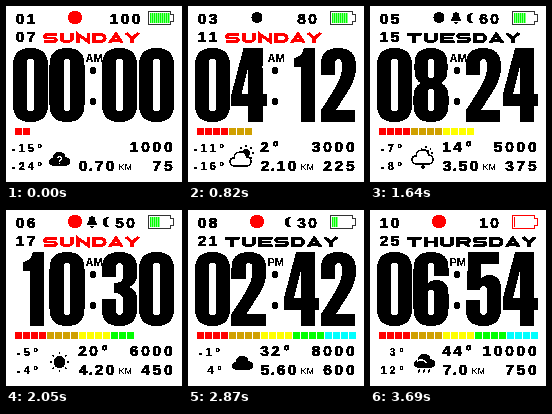
An HTML page with a canvas that plays this animation: 176 px wide and 176 px high, repeating every 4100 ms.

```html
<!DOCTYPE html>
<html lang="en">
<head>
<meta charset="utf-8">
<title>Watch face</title>
<style>
html, body { margin: 0; width: 100%; height: 100%; overflow: hidden; background: #fff; }
canvas { display: block; width: 176px; height: 176px; image-rendering: pixelated; }
</style>
</head>
<body>
<canvas id="face" width="176" height="176"></canvas>
<script>
const SIZE = 176, STEP = 410, COUNT = 10;
const RED = '#f00', BLACK = '#000', WHITE = '#fff';
const canvas = document.getElementById('face');
const ctx = canvas.getContext('2d', { willReadFrequently: true });

const slot = (y, h) => `M14 ${y + 3}Q14 ${y} 17.5 ${y}T21 ${y + 3}V${y + h - 3}Q21 ${y + h} 17.5 ${y + h}T14 ${y + h - 3}Z`;
// Hour and minute digits, drawn in a 35 x 74 box
const DIGITS = {
  0: 'M0 17Q0 0 17.5 0T35 17V57Q35 74 17.5 74T0 57Z' + slot(11, 52),
  1: 'M20 0H31V74H17V19H10V10Q18 9 20 0Z',
  2: 'M0 27V16Q0 0 17.5 0T35 18Q35 30 29 40L15 62H34V74H0V62Q16 38 19 30Q21 24 21 17Q21 11 17.5 11T14 16V27Z',
  3: 'M0 25V16Q0 0 17.5 0T35 16V22Q35 32 27 35Q35 38 35 47V57Q35 74 17.5 74T0 58V47H14V58Q14 63 17.5 63T21 58V48Q21 41 12 41V31Q21 31 21 25V16Q21 11 17.5 11T14 16V25Z',
  4: 'M12 0H31V46H35V58H31V74H17V58H0V46ZM17 18L10 46H17Z',
  5: 'M2 0H33V12H15V27Q18 23 23 23Q35 23 35 37V57Q35 74 17.5 74T0 58V48H14V58Q14 63 17.5 63T21 58V38Q21 34 17.5 34T14 38H1Z',
  6: 'M35 24V16Q35 0 17.5 0T0 17V57Q0 74 17.5 74T35 57V42Q35 28 23 28Q17 28 14 32V16Q14 11 17.5 11T21 16V24Z' + slot(38, 25),
  8: 'M17.5 0Q34 0 34 16V22Q34 32 28 35Q35 39 35 48V57Q35 74 17.5 74T0 57V48Q0 39 7 35Q1 32 1 22V16Q1 0 17.5 0Z' + slot(11, 19) + slot(41, 22)
};
// Wide weekday capitals, stroked in a 10 x 10 box
const CAPS = {
  S: 'M9.6 1.3H3Q1.3 1.3 1.3 3T3 5H7Q8.7 5 8.7 6.8T7 8.7H.5',
  U: 'M1.5 0V6Q1.5 8.7 5 8.7T8.5 6V0',
  N: 'M1.4 10V1.2L8.6 8.8V0',
  D: 'M0 1.3H5Q8.5 1.3 8.5 5T5 8.7H1.5V1.3',
  A: 'M.8 10L5 1.2L9.2 10M2.5 7.2H7.5',
  Y: 'M.8 0L5 5.5L9.2 0M5 5V10',
  T: 'M0 1.3H10M5 1V10',
  H: 'M1.5 0V10M8.5 0V10M1.5 5H8.5',
  E: 'M10 1.3H1.5V8.7H10M1.5 5H9.3',
  R: 'M1.5 10V1.3H7Q8.7 1.3 8.7 3.5T7 5.8H2M6 6L9 10',
  F: 'M10 1.3H1.5V10M1.5 5.3H9.3',
  I: 'M1.5 0V10'
};
const DAYS = ['SUNDAY', 'MONDAY', 'TUESDAY', 'WEDNESDAY', 'THURSDAY', 'FRIDAY', 'SATURDAY'];
const BAR_COLORS = [RED, '#d0a000', '#ff0', '#0f0', '#0ff'];
const SKY = ['unknown', 'sun', 'partly', 'cloud', 'shower', 'sun', 'cloud', 'cloud', 'rain', 'storm'];

const pad = n => String(n).padStart(2, '0');

function rect(x, y, w, h, color = BLACK) {
  ctx.fillStyle = color;
  ctx.fillRect(x, y, w, h);
}

function disc(x, y, r, color = BLACK) {
  ctx.fillStyle = color;
  ctx.beginPath();
  ctx.arc(x, y, r, 0, 7);
  ctx.fill();
}

function fill(path, color = BLACK) {
  ctx.fillStyle = color;
  ctx.fill(new Path2D(path), 'evenodd');
}

function line(path, width, color = BLACK) {
  ctx.strokeStyle = color;
  ctx.lineWidth = width;
  ctx.stroke(new Path2D(path));
}

// Hard pixel edges, as on an eight-colour display
function snap() {
  const image = ctx.getImageData(0, 0, SIZE, SIZE);
  const px = image.data;
  for (let k = 0; k < px.length; k++) px[k] = px[k] > 127 ? 255 : 0;
  ctx.putImageData(image, 0, 0);
}

const advance = (ch, cell) => ch === '.' ? cell * .45 : ch === '-' ? cell * .8 : cell;
const measure = (s, cell) => [...s].reduce((sum, ch) => sum + advance(ch, cell), 0);

// Centres each character in its cell; returns the right edge
function cells(s, x, y, cell = 11, size = 15.5, weight = .7) {
  ctx.font = `bold ${size}px "Liberation Sans", Arial, sans-serif`;
  ctx.textAlign = 'center';
  ctx.fillStyle = ctx.strokeStyle = BLACK;
  ctx.lineWidth = weight;
  for (const ch of s) {
    const w = advance(ch, cell);
    ctx.fillText(ch, x + w / 2, y);
    ctx.strokeText(ch, x + w / 2, y);
    x += w;
  }
  return x;
}

function label(s, x, y, font) {
  ctx.font = `${font} "Liberation Sans", Arial, sans-serif`;
  ctx.textAlign = 'left';
  ctx.fillStyle = BLACK;
  ctx.fillText(s, x, y);
}

function bigDigit(d, x) {
  ctx.save();
  ctx.translate(x, 42);
  fill(DIGITS[d]);
  ctx.restore();
}

function weekday(day) {
  let x = 37;
  for (const ch of DAYS[day]) {
    ctx.save();
    ctx.translate(x, 27);
    ctx.scale(1.47, 1);
    line(CAPS[ch], 2.6, day ? BLACK : RED);
    ctx.restore();
    x += ch === 'I' ? 6 : 16.4;
  }
}

function battery(pct) {
  const color = pct <= 10 ? RED : '#333';
  ctx.strokeStyle = color;
  ctx.lineWidth = 1;
  ctx.strokeRect(142.5, 5.5, 22, 13);
  ctx.strokeRect(164.5, 8.5, 3, 7);
  rect(164, 9, 1, 6, WHITE);
  const [dark, light] = pct <= 10 ? [RED, WHITE] : pct <= 20 ? ['#fd0', '#fe6'] : ['#0f0', '#8f8'];
  for (let i = 0; i < pct / 10; i++) {
    rect(144 + i * 2, 7, 1, 10, dark);
    rect(145 + i * 2, 7, 1, 10, light);
  }
}

function bell() {
  fill('M86 6Q90 7 89.5 11L91.5 15H80.5L82.5 11Q82 7 86 6ZM84 16H88L86 18Z');
}

function moon() {
  fill('M104 7Q97 6.5 96.5 12T104 17Q100.5 15 100.5 12T104 7Z');
}

function cloud(dx = 0, dy = 0, hollow = false) {
  const shape = 'M47 160Q43 159 43 155.5T47 152Q47 146 53 146T59.5 151Q64 151.5 64 155.5T59.5 160Z';
  ctx.save();
  ctx.translate(dx, dy);
  fill(shape, hollow ? WHITE : BLACK);
  if (hollow) line(shape, 1.4);
  ctx.restore();
}

function sun(x, y, r) {
  disc(x, y, r);
  for (let i = 0; i < 8; i++) {
    const c = Math.cos(i * Math.PI / 4), s = Math.sin(i * Math.PI / 4);
    line(`M${x + c * (r + 1.5)} ${y + s * (r + 1.5)}L${x + c * (r + 4)} ${y + s * (r + 4)}`, 1.5);
  }
}

function weather(kind) {
  if (kind === 'unknown') {
    cloud();
    ctx.font = 'bold 11px "Liberation Sans", Arial, sans-serif';
    ctx.textAlign = 'center';
    ctx.fillStyle = WHITE;
    ctx.fillText('?', 53.5, 158);
  } else if (kind === 'sun') {
    sun(53.5, 152, 6);
  } else if (kind === 'cloud') {
    cloud(1, 0);
  } else if (kind === 'partly') {
    sun(58, 147, 4);
    cloud(-1, 0, true);
  } else if (kind === 'shower') {
    sun(56, 147, 3.5);
    cloud(-1, -2, true);
    disc(53, 161, 2);
  } else {
    cloud(1, -2);
    if (kind === 'storm') line('M47 151Q53 148 57 153', 1.4, WHITE);
    line('M50 159L48 163M55 159L53 163M60 159L58 163', 1.5);
  }
}

function smallTemp(t, y) {
  const s = t + '°';
  const x = s.length > 3 ? 4 : s.length > 2 ? 9 : 18;
  cells(s, x, y, 9, 11, .3);
}

function draw(i) {
  rect(0, 0, SIZE, SIZE, WHITE);

  const month = i + 1, date = 7 + 2 * i, pct = 100 - 10 * i;
  const hour = 2 * i, steps = 1000 * (i + 1);

  cells(pad(month), 8.5, 18);
  cells(pad(date), 8.5, 36);
  weekday(new Date(2018, month - 1, date).getDay());

  const linked = i > 0 && i < 5;
  disc(69, 11.5, linked ? 5.5 : 7, linked ? BLACK : RED);
  if (i > 2 && i < 7) bell();
  if (i > 3 && i < 8) moon();
  const level = String(pct);
  cells(level, 119 - measure(level, 11) / 2, 18);

  const time = pad(hour % 12) + pad(6 * i);
  [7, 43.5, 96, 133].forEach((x, n) => bigDigit(time[n], x));
  for (const y of [61, 92]) fill(`M86 ${y}H88L90 ${y + 2}V${y + 5}L88 ${y + 7}H86L84 ${y + 5}V${y + 2}Z`);
  label(hour < 12 ? 'AM' : 'PM', 79.5, 56, 'bold 11px');

  smallTemp(2 * i - 15, 146);
  smallTemp(4 * i - 24, 164);
  weather(SKY[i]);
  if (i) cells(6 * i - 10 + '°', 71, 146);

  const km = (.7 * (i + 1)).toFixed(i < 9 ? 2 : 1);
  label('KM', cells(km, 71.5, 165) + 3, 164, '9px');

  const right = (s, y) => cells(s, 168 - measure(s, 11.4), y, 11.4);
  right(String(steps), 146);
  right(String(75 * (i + 1)), 165);

  snap();
  battery(pct);
  const blocks = Math.min(20, Math.floor(steps / 400));
  for (let b = 0; b < blocks; b++) rect(9 + b * 8, 122, 7, 7, BAR_COLORS[b >> 2]);
}

let shown = -1;
const start = performance.now();
function tick() {
  const i = Math.floor((performance.now() - start) / STEP) % COUNT;
  if (i !== shown) draw(shown = i);
  requestAnimationFrame(tick);
}
tick();
</script>
</body>
</html>
```
